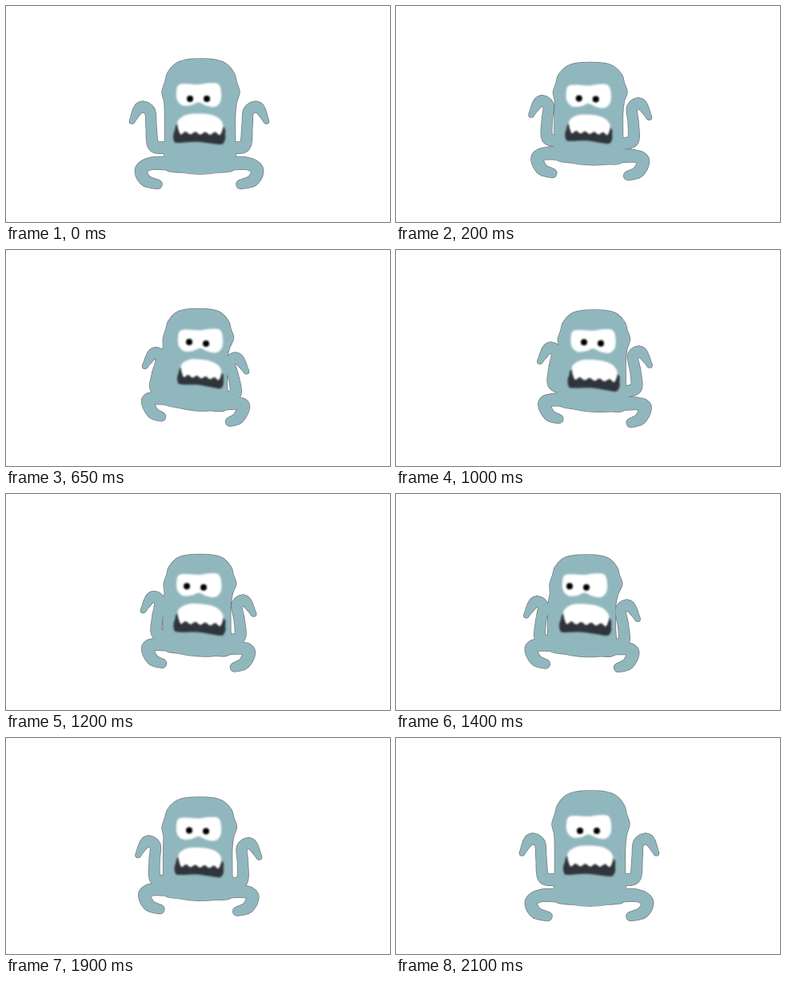
An HTML page with a canvas that plays this animation: 480 px wide and 270 px high, repeating every 2.15 s.

```html
<!DOCTYPE html>
<html lang="en">
<head>
<meta charset="utf-8">
<title>Wobbling monster</title>
<style>
  html, body { margin: 0; width: 100%; height: 100%; overflow: hidden; background: #fff; }
  canvas { display: block; width: 480px; height: 270px; }
</style>
</head>
<body>
<canvas id="stage" width="480" height="270"></canvas>
<script>
const ctx = document.getElementById('stage').getContext('2d');
const LOOP = 2150, STEP = 50;
const SKIN = '#91b7be', EDGE = '#737b7e', DARK = '#30353b';

// head, face and limbs: centre x; top: crown y; tuck: limbs drawn in;
// lift: arms raised; shout: mouth opening; gaze: pupil shift
const REST = { at: 0, head: 243.5, face: 240.5, limbs: 241.5, top: 66, tuck: 0, lift: 0, shout: 1, gaze: 0 };
const KEYS = [
  REST,
  { at: 400, head: 242, face: 240, limbs: 244, top: 75, tuck: 1, lift: 4, shout: 0, gaze: -2 },
  { at: 650, head: 240.5, face: 242.5, limbs: 237, top: 73.5, tuck: 1, lift: 0, shout: .4, gaze: -3 },
  { at: 800, head: 244, face: 244, limbs: 239.5, top: 72.5, tuck: .15, lift: 0, shout: .7, gaze: -2 },
  { at: 1000, head: 247.5, face: 246, limbs: 248.5, top: 75, tuck: .75, lift: 5, shout: 1, gaze: -.5 },
  { at: 1400, head: 237.5, face: 235.5, limbs: 232.5, top: 76, tuck: .7, lift: -7, shout: 1, gaze: -8 },
  { at: 1700, head: 240, face: 240.5, limbs: 240, top: 82, tuck: .8, lift: -10, shout: .4, gaze: -2 },
  { ...REST, at: 2100 }
];

// Right-hand limbs as centre lines from body to tip; the left ones are mirrored
const ARM = {
  wide: [[41, -33], [57, -35.5], [60, -60], [62, -79], [74, -83], [84, -66]],
  tucked: [[40, -19], [50, -25], [48, -42], [43, -63], [52.5, -68], [63.5, -52]],
  widths: [14, 14, 13, 13, 13, 6]
};
const LEG = {
  wide: [[33, -13], [60, -13], [72.5, -5], [67, 8], [52, 13]],
  tucked: [[28, -12], [52, -12], [60, -8], [53.5, 6], [43, 11]],
  widths: [17, 15, 15, 14, 11]
};

// Right half of the body, crown to base, in half widths and heights
const BODY_HALF = [
  [.4, .01], [.66, .045], [.86, .125], [.92, .2], [1, .29], [.97, .38],
  [1, .5], [1, .72], [.99, .95], [.5, .987]
];
const EYES = [
  [.02, .32], [.07, .08], [.25, .04], [.5, .07], [.75, .01], [.94, .06], [1, .4],
  [.98, .8], [.86, 1], [.68, .96], [.5, .82], [.35, .93], [.15, .94], [.03, .7]
];
const JAW = [
  [.1, .36], [.03, .56], [0, .76], [.03, .95], [.12, .97], [.45, .93], [.7, .97],
  [.92, 1], [.99, .88], [1, .7], [.95, .42], [.5, .35]
];
const GUM = [[.08, .35], [.13, .17], [.28, .03], [.5, 0], [.72, .03], [.88, .15], [.96, .38]];
const FANGS = Array.from({ length: 9 }, (_, i) => [.9 - .095 * i, i % 2 ? .6 : .69]);
const TEETH = [...GUM, ...FANGS];

const mix = (a, b, k) => a + (b - a) * k;
const clamp = v => Math.min(1, Math.max(0, v));
const ease = k => k * k * (3 - 2 * k);

function poseAt(time) {
  const next = Math.max(1, KEYS.findIndex(key => key.at > time));
  const b = time >= LOOP - STEP ? REST : KEYS[next];
  const a = b === REST ? REST : KEYS[next - 1];
  const k = a === b ? 0 : ease((time - a.at) / (b.at - a.at));
  const pose = {};
  for (const name in a) pose[name] = mix(a[name], b[name], k);
  // The trunk shortens, leans and narrows as the limbs tuck in
  const { head, limbs, top, tuck } = pose;
  pose.base = (head + limbs) / 2 - 4 * tuck;
  pose.bottom = top + 127 + 17 * (1 - tuck) ** 4;
  pose.tilt = 4 * tuck;
  return pose;
}

// Closed smooth curve through the points
function addOutline(path, pts) {
  const n = pts.length, at = i => pts[(i + n) % n];
  path.moveTo(...pts[0]);
  for (let i = 0; i < n; i++) {
    const [a, b, c, d] = [at(i - 1), at(i), at(i + 1), at(i + 2)];
    path.bezierCurveTo(
      b[0] + (c[0] - a[0]) / 6, b[1] + (c[1] - a[1]) / 6,
      c[0] - (d[0] - b[0]) / 6, c[1] - (d[1] - b[1]) / 6, c[0], c[1]);
  }
  path.closePath();
}

function addBody(path, { head, top, tuck, base, bottom, tilt }) {
  const place = ([u, v]) => {
    const k = ease(clamp((v - .28) / .22));
    const half = mix(48.5 - 4.5 * tuck, 44 - 2.5 * tuck, k);
    return [mix(head, base, k) + u * half, mix(top, bottom, v) + tilt * u * clamp((v - .7) * 4)];
  };
  const mirrored = BODY_HALF.map(([u, v]) => [-u, v]).reverse();
  addOutline(path, [[0, 0], ...BODY_HALF, [0, 1], ...mirrored].map(place));
}

// Catmull-Rom value between b and c
function curve(a, b, c, d, t) {
  return b + t / 2 * (c - a + t * (2 * a - 5 * b + 4 * c - d + t * (3 * (b - c) + d - a)));
}

// A limb is a row of overlapping discs; side is -1 or 1
function addLimb(path, { wide, tucked, widths }, side, pose, lift) {
  const pts = wide.map(([x, y], i) => [
    pose.limbs + side * mix(x, tucked[i][0], pose.tuck),
    pose.bottom + mix(y, tucked[i][1], pose.tuck) - lift + side * pose.tilt * .8,
    widths[i] / 2
  ]);
  const end = pts.length - 1, N = 24;
  for (let i = 0; i < end; i++) {
    const q = [pts[Math.max(0, i - 1)], pts[i], pts[i + 1], pts[Math.min(end, i + 2)]];
    for (let s = 0; s <= N; s++) {
      const [x, y, r] = [0, 1, 2].map(n => curve(q[0][n], q[1][n], q[2][n], q[3][n], s / N));
      path.moveTo(x + r, y);
      path.arc(x, y, r, 0, 7);
    }
  }
}

// Unit shape centred on cx, hanging from y
function fillShape(shape, cx, y, w, h, slant, color) {
  const path = new Path2D();
  addOutline(path, shape.map(([u, v]) => [cx + (u - .5) * w, y + v * h + slant * (u - .5)]));
  ctx.fillStyle = color;
  ctx.fill(path);
}

function drawFace({ face, top, tilt, shout, gaze }) {
  const y = 96 + (top - 66) * .3;
  const mouth = [face + shout, y + 38.5, 53 + 12 * shout, 32 + 6 * shout, tilt + 1];
  ctx.filter = 'blur(0.9px)';
  fillShape(EYES, face, y, 57, 30, 0, '#fff');
  fillShape(JAW, ...mouth, DARK);
  fillShape(TEETH, ...mouth, '#fff');
  ctx.fillStyle = '#000';
  for (const side of [-1, 1]) {
    ctx.beginPath();
    ctx.arc(face + gaze + side * 10.5, 116 + side * tilt / 4, 4, 0, 7);
    ctx.fill();
  }
  ctx.filter = 'none';
}

function draw(time) {
  const pose = poseAt(time);
  ctx.fillStyle = '#fff';
  ctx.fillRect(0, 0, 480, 270);

  const skin = new Path2D();
  addBody(skin, pose);
  for (const side of [-1, 1]) {
    addLimb(skin, ARM, side, pose, pose.lift);
    addLimb(skin, LEG, side, pose, 0);
  }
  ctx.strokeStyle = EDGE;
  ctx.lineWidth = 1.5;
  ctx.stroke(skin);
  ctx.fillStyle = SKIN;
  ctx.fill(skin);
  drawFace(pose);
}

const start = performance.now();
let shown = -1;
function tick() {
  const t = Math.max(0, performance.now() - start) % LOOP;
  const step = Math.floor(t / STEP) * STEP;
  if (step !== shown) draw(shown = step);
  requestAnimationFrame(tick);
}
tick();
</script>
</body>
</html>
```
